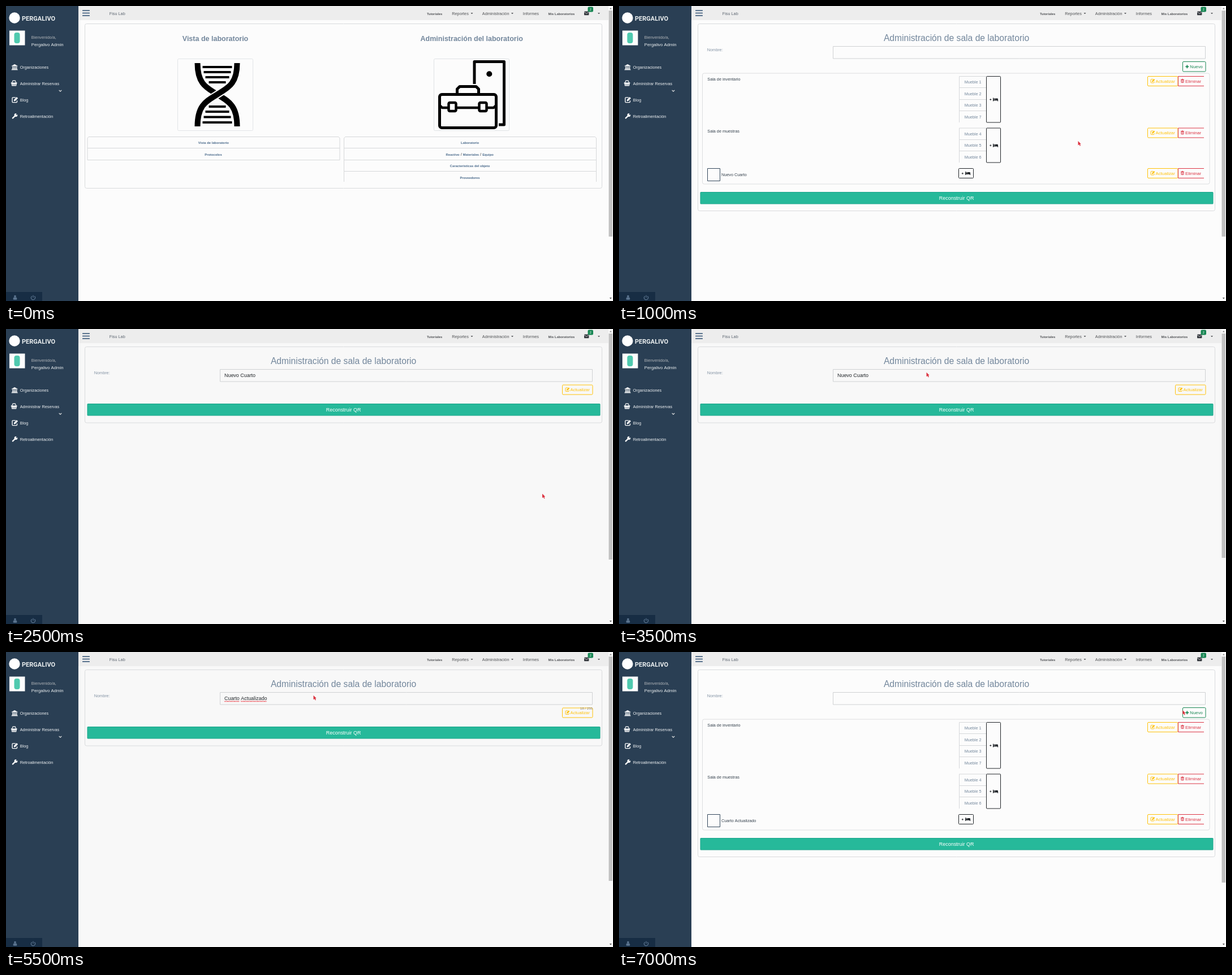
Recreate the animation shown at these times as an HTML page with a canvas. Size 1073 by 522 pixels, loop 7500 ms.

```html
<!DOCTYPE html>
<html lang="es">
<head>
<meta charset="utf-8">
<title>Laboratorio</title>
<style>
html, body { margin: 0; width: 100%; height: 100%; overflow: hidden; background: #fcfcfc; }
canvas { display: block; width: 1073px; height: 522px; }
</style>
</head>
<body>
<canvas id="stage" width="1073" height="522"></canvas>
<script>
const ctx = document.getElementById('stage').getContext('2d');
const LOOP = 7500;
const SANS = '"Liberation Sans", Arial, sans-serif';
const SMALL = 5.81, BODY = 7.27, BTN = 7.82, LARGE = 8.94;
const SLATE = '#73879c', YELLOW = '#ffc107', RED = '#dc3545', GREEN = '#198754';
const BORDER = '#d6d8da', INK = '#212529';

function text(str, x, y, size, color, opt = {}) {
  ctx.font = (opt.bold ? 'bold ' : '') + size + 'px ' + (opt.font || SANS);
  ctx.textAlign = opt.align || 'left';
  ctx.fillStyle = color;
  ctx.fillText(str, x, y);
}

function fill(x, y, w, h, color, r = 0) {
  ctx.fillStyle = color;
  ctx.beginPath();
  ctx.roundRect(x, y, w, h, r);
  ctx.fill();
}

function box(x, y, w, h, color, r = 0, width = 1) {
  ctx.strokeStyle = color;
  ctx.lineWidth = width;
  ctx.beginPath();
  ctx.roundRect(x, y, w, h, r);
  ctx.stroke();
}

function line(points, color, width = 1) {
  ctx.strokeStyle = color;
  ctx.lineWidth = width;
  ctx.beginPath();
  points.forEach(([x, y]) => ctx.lineTo(x, y));
  ctx.stroke();
}

function poly(points, color) {
  ctx.fillStyle = color;
  ctx.beginPath();
  points.forEach(([x, y]) => ctx.lineTo(x, y));
  ctx.fill();
}

function dot(x, y, r, color) {
  ctx.fillStyle = color;
  ctx.beginPath();
  ctx.arc(x, y, r, 0, Math.PI * 2);
  ctx.fill();
}

function at(x, y, scale, draw) {
  ctx.save();
  ctx.translate(x, y);
  ctx.scale(scale, scale);
  draw();
  ctx.restore();
}

// Icons: drawn around their top left corner
function editIcon(x, y, s, color) {
  at(x, y, s / 10, () => {
    line([[6.2, 1.2], [1.5, 1.2], [.7, 2], [.7, 8.3], [1.5, 9.2], [7.6, 9.2], [8.4, 8.3], [8.4, 6.2]], color, 1.2);
    poly([[3.3, 5], [7.8, .5], [9.8, 2.4], [5.3, 7], [3.3, 7]], color);
  });
}

function trashIcon(x, y, color) {
  box(x + .9, y + 2, 4.2, 4.7, color, .5, .9);
  line([[x, y + 1.5], [x + 6, y + 1.5]], color, 1);
  line([[x + 2, y + .6], [x + 4, y + .6]], color, .9);
  line([[x + 2.3, y + 3], [x + 2.3, y + 6]], color, .6);
  line([[x + 3.7, y + 3], [x + 3.7, y + 6]], color, .6);
}

function bedIcon(x, y) {
  fill(x, y, 1.2, 6, INK);
  fill(x, y + 3, 9, 1.8, INK);
  fill(x + 7.9, y + 3, 1.2, 3, INK);
  dot(x + 2.6, y + 1.8, 1.1, INK);
  fill(x + 4, y + 1, 5, 2.2, INK, [0, 1.2, 0, 0]);
}

function plus(x, y, r, color, width) {
  line([[x - r, y], [x + r, y]], color, width);
  line([[x, y - r], [x, y + r]], color, width);
}

function caret(x, y, color) {
  poly([[x - 2, y - 1], [x + 2, y - 1], [x, y + 1.2]], color);
}

function bankIcon(x, y) {
  poly([[x, y + 3], [x + 5.5, y], [x + 11, y + 3], [x + 11, y + 3.6], [x, y + 3.6]], '#fff');
  for (let i = 0; i < 4; i++) fill(x + 1.5 + i * 2.3, y + 4, 1.3, 4, '#fff');
  fill(x + .8, y + 8, 9.4, 1, '#fff');
  fill(x, y + 9.3, 11, 1.1, '#fff');
}

function basketIcon(x, y) {
  fill(x, y + 4, 11, 1.6, '#fff', .6);
  poly([[x + .8, y + 5.5], [x + 10.2, y + 5.5], [x + 9.4, y + 10], [x + 1.6, y + 10]], '#fff');
  line([[x + 1.8, y + 4.5], [x + 3.4, y + .6], [x + 7.6, y + .6], [x + 9.2, y + 4.5]], '#fff', 1.1);
  for (let i = 0; i < 3; i++) fill(x + 2.8 + i * 2.3, y + 6.3, .8, 2.7, '#2a3f54');
}

function wrenchIcon(x, y) {
  ctx.lineCap = 'round';
  line([[x + 1.4, y + 8.4], [x + 6, y + 4]], '#fff', 2.3);
  ctx.lineCap = 'butt';
  dot(x + 7, y + 3, 2.9, '#fff');
  poly([[x + 7, y + 2.8], [x + 8.2, y - .6], [x + 11, y + 2]], '#2a3f54');
}

function sidebar() {
  fill(0, 0, 128, 522, '#2a3f54');
  dot(15, 21, 9.7, '#fff');
  text('PERGALIVO', 28, 25.5, 11, '#ecf0f1', { bold: true, font: 'Roboto, sans-serif' });
  fill(6, 43.5, 27.5, 26, '#fdfdfd');
  fill(14.5, 47, 10, 19, '#4fc9ae', 4);
  text('Bienvenido/a,', 44.8, 57.5, BODY, '#b0b4b8');
  text('Pergalivo Admin', 44.8, 71, BTN, '#ecf0f1');
  bankIcon(9.7, 103);
  basketIcon(8.7, 131.5);
  editIcon(10.3, 160.5, 11, '#fff');
  wrenchIcon(10.5, 190);
  [['Organizaciones', 111.3], ['Administrar Reservas', 140.3], ['Blog', 169.3], ['Retroalimentación', 198.3]]
    .forEach(([s, y]) => text(s, 24.7, y, BODY, '#eef1f3'));
  line([[93.7, 148.8], [96, 151.2], [98.3, 148.8]], '#e7e7e7', 1.2);

  fill(0, 506, 64, 16, '#172d44');
  dot(16, 513.6, 1.9, '#5a738e');
  fill(12.7, 515.2, 6.6, 4.6, '#5a738e', [2.4, 2.4, 1, 1]);
  ctx.strokeStyle = '#5a738e';
  ctx.lineWidth = 1.2;
  ctx.beginPath();
  ctx.arc(48, 516.2, 3.5, -.9, Math.PI + .9);
  ctx.stroke();
  line([[48, 511.7], [48, 516]], '#5a738e', 1.2);
}

function topbar() {
  fill(128, 0, 937, 25, '#ededed');
  for (let i = 0; i < 3; i++) fill(135, 7 + i * 4.5, 13, 2, '#5a738e', .5);
  const ink = '#515356', bold = { bold: true };
  text('Fisu Lab', 182.8, 15.5, BODY, '#5c6570');
  text('Tutoriales', 744, 15.5, SMALL, ink, bold);
  text('Reportes', 788.3, 15.5, BODY, ink);
  caret(823.5, 13, ink);
  text('Administración', 841.8, 15.5, BODY, ink);
  caret(895, 13, ink);
  text('Informes', 913.7, 15.5, BODY, ink);
  text('Mis Laboratorios', 958.6, 15.5, SMALL, ink, bold);
  fill(1022, 9.5, 8.4, 6.8, '#34383e', .8);
  line([[1022, 10.6], [1026.2, 13.4], [1030.4, 10.6]], '#ededed', .8);
  fill(1028.5, 1.5, 9.5, 9, GREEN, 2);
  text('2', 1033.2, 8, 5.4, '#fff', { align: 'center' });
  caret(1048, 13, ink);
}

function scrollbar(bottom, bg) {
  fill(1065, 0, 8, 522, bg);
  fill(1065.5, 8, 6.5, bottom - 8, '#c1c1c1');
  poly([[1066.8, 5.4], [1070.8, 5.4], [1068.8, 3]], '#8c8c8c');
  poly([[1066.8, 516], [1070.8, 516], [1068.8, 518.4]], '#505050');
}

function panel(h) {
  box(139.5, 31.5, 914, h, '#d9dbdd', 3);
}

function dna() {
  const strand = dir => {
    ctx.beginPath();
    ctx.moveTo(373.5 - 35 * dir, 101);
    ctx.bezierCurveTo(373.5 - 35 * dir, 139, 373.5 - 18 * dir, 145, 373.5, 156.5);
    ctx.bezierCurveTo(373.5 + 18 * dir, 168, 373.5 + 35 * dir, 174, 373.5 + 35 * dir, 213);
    ctx.stroke();
  };
  [[108, 26], [117, 24], [126, 21], [135, 15], [178, 15], [187, 21], [196.5, 24], [206, 26]]
    .forEach(([y, r]) => line([[373.5 - r, y], [373.5 + r, y]], '#000', 4));
  ctx.lineWidth = 10;
  strand(1);
  ctx.save();
  ctx.beginPath();
  ctx.rect(352, 142, 43, 29);
  ctx.clip();
  ctx.strokeStyle = '#fcfcfc';
  ctx.lineWidth = 14;
  strand(-1);
  ctx.restore();
  ctx.lineWidth = 10;
  strand(-1);
}

function toolbox() {
  ctx.lineJoin = 'round';
  line([[828, 138], [828, 98.5], [880.5, 98.5], [880.5, 210], [871, 210]], '#000', 5);
  dot(854.3, 120.3, 5, '#000');
  line([[797.5, 156], [797.5, 147], [802, 142.5], [831, 142.5], [835.5, 147], [835.5, 156]], '#000', 5);
  box(766.5, 156.5, 100, 59, '#000', 4, 5);
  line([[767, 176], [771, 180], [862, 180], [866, 176]], '#000', 4.5);
  [782.5, 836.5].forEach(x => {
    fill(x, 171, 13, 15, '#fcfcfc');
    box(x, 171, 13, 15, '#000', 2, 4.5);
  });
  ctx.lineJoin = 'miter';
}

function listBox(x, bottoms, closed) {
  const end = bottoms[bottoms.length - 1];
  line([[x, end], [x, 234], [x + 2, 231.5], [x + 444, 231.5], [x + 446, 234], [x + 446, end]], BORDER);
  bottoms.forEach((y, i) => {
    if (closed || i < bottoms.length - 1) line([[x, y], [x + 446, y]], BORDER);
  });
}

function home(hover) {
  const mid = { bold: true, align: 'center' }, link = '#4a6a8b';
  panel(291);
  text('Vista de laboratorio', 370, 61.6, 12.5, SLATE, mid);
  text('Administración del laboratorio', 823.2, 61.6, 12.5, SLATE, mid);
  box(303.5, 93.5, 133, 127, '#e2e5e8', 2);
  box(756.5, 93.5, 133, 127, '#dfe2e5', 2);
  dna();
  toolbox();
  listBox(144, [251.5, 272.5], true);
  listBox(597.5, [251.5, 272.5, 292.5, 311], false);
  text('Vista de laboratorio', 366.8, 244.3, SMALL, link, mid);
  text('Protocolos', 366.5, 264.7, SMALL, link, mid);
  text('Laboratorio', 820, 244.3, SMALL, hover ? '#23527c' : link, mid);
  let x = 777.5;
  ['Reactivo', ' / ', 'Materiales', ' / ', 'Equipo'].forEach(s => {
    const slash = s === ' / ';
    text(s, x, 264.7, slash ? BODY : SMALL, slash ? '#333' : link, { bold: !slash });
    x += ctx.measureText(s).width;
  });
  text('Características del objeto', 820, 285, SMALL, link, mid);
  text('Proveedores', 820, 305.5, SMALL, link, mid);
}

function updateButton(x, y, on) {
  if (on) fill(x, y, 54, 17.5, YELLOW, 1.5);
  else box(x + .5, y + .5, 53.5, 17, YELLOW, 1.5);
  const ink = on ? '#111' : YELLOW;
  editIcon(x + 5.5, y + 4.6, 8, ink);
  text('Actualizar', x + 14.5, y + 11.5, BTN, ink);
}

function rowButtons(y, on) {
  updateButton(934, y, on);
  line([[1034, y + .5], [988.5, y + .5], [988.5, y + 17.5], [1034, y + 17.5]], RED);
  trashIcon(993, y + 4.8, RED);
  text('Eliminar', 1001, y + 11.5, BTN, RED);
}

function furniture(y, numbers) {
  const h = numbers.length * 20.5;
  line([[601.5, y + h], [601.5, y + .5], [649, y + .5]], BORDER);
  numbers.forEach((n, i) => {
    const top = y + i * 20.5;
    if (i) line([[601.5, Math.floor(top) + .5], [649, Math.floor(top) + .5]], BORDER);
    text('Mueble ' + n, 610.7, top + 13.2, BODY, SLATE);
  });
  box(649.5, y + .5, 25, h - .5, INK, 1);
  plus(656.8, y + h / 2 + .5, 1.6, INK, .9);
  bedIcon(661, y + h / 2 - 2.5);
}

function form(value) {
  text('Administración de sala de laboratorio', 596.6, 61.8, 15.65, SLATE, { align: 'center' });
  text('Nombre:', 155.8, 79.6, BODY, '#8393a4');
  box(378.5, 71.5, 658, 21.5, '#cfd1d3');
  if (value) text(value, 386, 85, LARGE, INK);
}

function rebuild(y) {
  fill(143.5, y, 907, 21.5, '#169f85', 1.5);
  fill(144.3, y + .8, 905.4, 19.9, '#26b99a', 1);
  text('Reconstruir QR', 596.6, y + 13.8, LARGE, '#fff', { align: 'center' });
}

function rooms(name, hover) {
  panel(331);
  form('');
  box(996.5, 98.5, 40.5, 17.5, GREEN, 1.5);
  plus(1004.3, 107.3, 2.9, GREEN, 1.7);
  text('Nuevo', 1009.3, 110.3, BTN, GREEN);
  box(147.5, 119, 896.5, 196, '#dcdee0', 3);
  text('Sala de inventario', 156.3, 131.8, BODY, '#34404c');
  furniture(124, [1, 2, 3, 7]);
  rowButtons(124);
  text('Sala de muestras', 156.3, 223.8, BODY, '#34404c');
  furniture(215.5, [4, 5, 6]);
  rowButtons(215.5);
  box(156.5, 287.5, 22, 22, '#33475b');
  text(name, 181, 300.5, BODY, '#34404c');
  box(600.5, 287.5, 26, 17, INK, 1);
  plus(607.3, 296.3, 1.6, INK, .9);
  bedIcon(612, 293);
  rowButtons(287, hover);
  rebuild(329);
}

function squiggle(from, to) {
  ctx.beginPath();
  for (let x = from, i = 0; x <= to; x += 1.2, i++) ctx.lineTo(x, i % 2 ? 88.2 : 86.6);
  ctx.strokeStyle = '#e8323c';
  ctx.lineWidth = .8;
  ctx.stroke();
}

function edit(value, typed, hover) {
  panel(134.5);
  form(value);
  updateButton(983, 98.5, hover);
  if (typed) {
    squiggle(386, 413);
    squiggle(415, 461.5);
    text('18 / 255', 1037, 102, 6.15, '#87807a', { align: 'right' });
  }
  rebuild(132);
}

function cursor(x, y) {
  at(x, y, 1, () => poly([[0, 0], [5.2, 5.2], [3.2, 5.5], [4.5, 8], [3.2, 8.7], [2, 6.1], [0, 7.5]], '#dc3340'));
}

const OLD = 'Nuevo Cuarto', NEW = 'Cuarto Actualizado';
const WHITE = '#fcfcfc', GREY = '#f8f8f8';
const steps = [
  { t: 0, bg: WHITE, thumb: 408, draw: () => home(false) },
  { t: 500, bg: WHITE, thumb: 408, draw: () => home(true), tip: [811.5, 239] },
  { t: 1000, bg: WHITE, thumb: 408, draw: () => rooms(OLD, false), tip: [811.5, 239] },
  { t: 2000, bg: WHITE, thumb: 405, draw: () => rooms(OLD, true), tip: [948, 291.5] },
  { t: 2500, bg: GREY, thumb: 408, draw: () => edit(OLD), tip: [948, 291.5] },
  { t: 3500, bg: GREY, thumb: 405, draw: () => edit(OLD), tip: [543.5, 76.8] },
  { t: 4000, bg: GREY, thumb: 405, draw: () => edit(''), tip: [543.5, 76.8] },
  { t: 5500, bg: GREY, thumb: 405, draw: () => edit(NEW, true), tip: [543.5, 76.8] },
  { t: 6500, bg: GREY, thumb: 405, draw: () => edit(NEW, true, true), tip: [996.3, 103] },
  { t: 7000, bg: WHITE, thumb: 408, draw: () => rooms(NEW, false), tip: [996.3, 103] }
];

function render(time) {
  const step = steps.filter(s => s.t <= time).pop();
  fill(0, 0, 1073, 522, step.bg);
  sidebar();
  topbar();
  scrollbar(step.thumb, step.bg);
  step.draw();
  if (step.tip) cursor(...step.tip);
}

const start = performance.now();
function tick() {
  render((performance.now() - start) % LOOP);
  requestAnimationFrame(tick);
}
tick();
</script>
</body>
</html>
```
